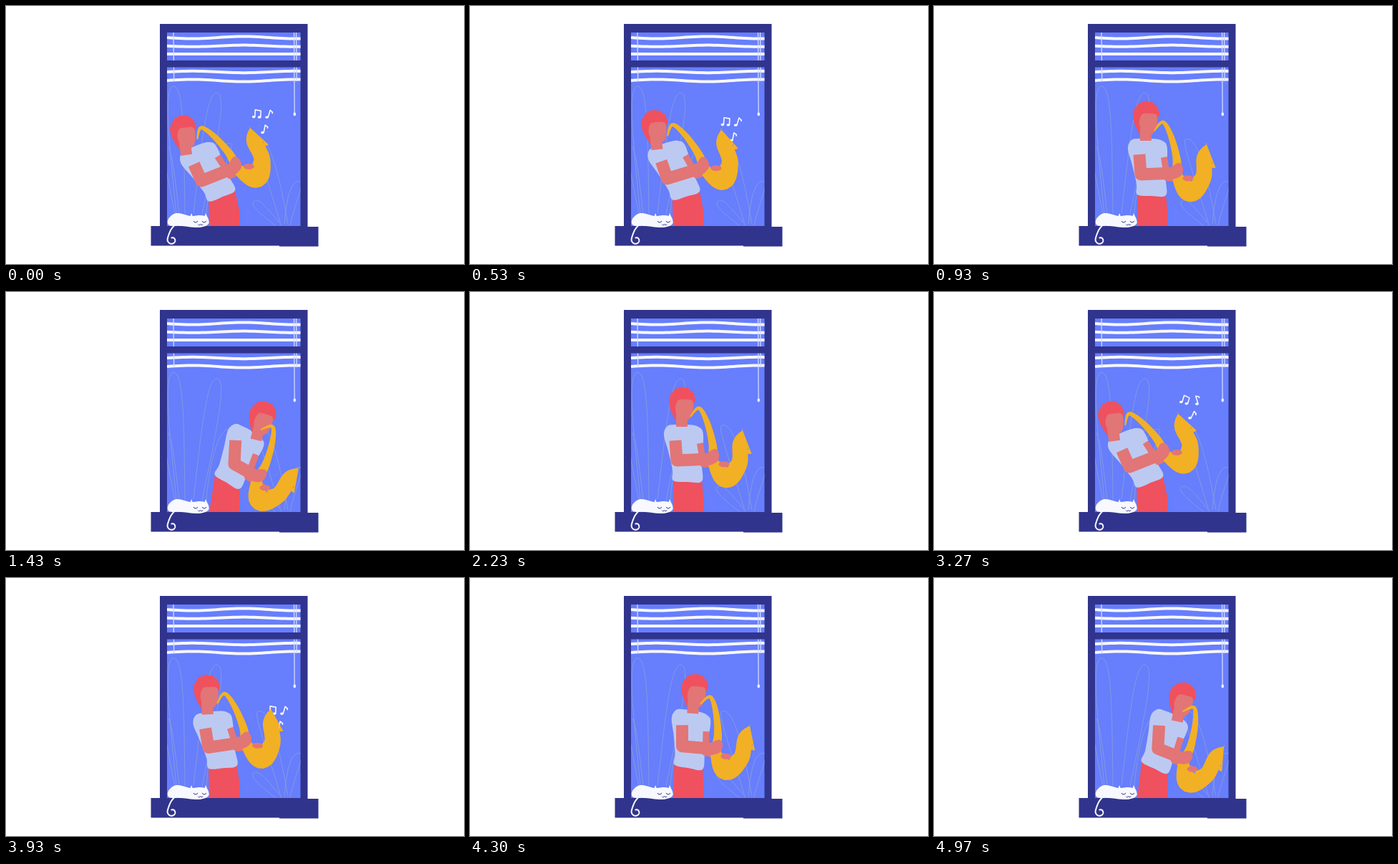
Write an HTML page with a canvas that moves like this. It is 640 px wide and 360 px high and loops after 5100 ms.

```html
<!DOCTYPE html>
<html lang="en">
<head>
<meta charset="utf-8">
<title>Saxophone at the window</title>
<style>
html, body { margin: 0; width: 100%; height: 100%; overflow: hidden; background: #fff; }
canvas { display: block; }
</style>
</head>
<body>
<canvas id="stage" width="640" height="360"></canvas>
<script>
const ctx = document.getElementById('stage').getContext('2d');
const COLOR = {
  frame: '#31348c', sky: '#677efd', leaf: '#8499e0', white: '#f8f8ff', cord: '#d3daff',
  red: '#ef515e', skin: '#e27576', shirt: '#bccaf2', gold: '#f2b024'
};

// The player sways back and forth in steps, pausing when bent forward.
const LOOP = 5100, STEP = 400 / 3, SWAY = 23.5 * STEP;
const BENT = 10.75 * STEP, RISE = BENT + 3 * STEP;
const TOP = 11, REST = 2;

function stepAt(time) {
  const t = time % SWAY + 3;
  if (t >= RISE) return TOP + 1 + Math.floor((t - RISE) / STEP);
  return t >= BENT ? TOP : Math.min(TOP - 1, Math.floor(t / STEP));
}

// 0 is leaning back, 1 is bent forward.
function leanAt(step) {
  const u = Math.max(0, 1 - Math.abs(step - TOP) / (TOP - REST));
  const v = u ** 1.25;
  return (v + (1 - Math.cos(Math.PI * v)) / 2) / 2;
}

// Quadratic through the back, upright and forward values.
function mix(p, back, up, fwd) {
  const m = .475, s1 = (up - back) / m, s2 = (fwd - up) / (1 - m);
  return back + s1 * p + (s2 - s1) * p * (p - m);
}

// Rigid part: rest pivot moves to (x, y) and turns by deg.
function rig(px, py, x, y, deg) {
  const a = deg * Math.PI / 180, c = Math.cos(a), s = Math.sin(a);
  return (u, v) => [x + (u - px) * c - (v - py) * s, y + (u - px) * s + (v - py) * c];
}

const still = (x, y) => [x, y];

function fill(color) {
  ctx.fillStyle = color;
  ctx.fill();
}

function stroke(color, width) {
  ctx.strokeStyle = color;
  ctx.lineWidth = width;
  ctx.stroke();
}

function rect(color, x, y, w, h) {
  ctx.fillStyle = color;
  ctx.fillRect(x, y, w, h);
}

function path(pts) {
  ctx.beginPath();
  pts.forEach(q => ctx.lineTo(...q));
}

function disc(color, [x, y], rx, ry = rx, tilt = 0) {
  ctx.beginPath();
  ctx.ellipse(x, y, rx, ry, tilt, 0, 2 * Math.PI);
  fill(color);
}

// Catmull-Rom samples through points of any dimension.
function spline(pts, closed) {
  const n = pts.length, out = [];
  const at = i => pts[closed ? (i + n) % n : Math.max(0, Math.min(n - 1, i))];
  for (let i = 0; i < (closed ? n : n - 1); i++) {
    const [a, b, c, d] = [at(i - 1), at(i), at(i + 1), at(i + 2)];
    for (let t = 0; t < 1; t += .125) {
      out.push(b.map((_, k) => b[k] + t / 2 * (c[k] - a[k] +
        t * (2 * a[k] - 5 * b[k] + 4 * c[k] - d[k] + t * (3 * (b[k] - c[k]) + d[k] - a[k])))));
    }
  }
  if (!closed) out.push(at(n - 1));
  return out;
}

function blob(color, pts, map = still) {
  path(spline(pts, true).map(q => map(...q)));
  fill(color);
}

// Tapered tube along [x, y, radius] points.
function tube(color, pts, map) {
  const mid = spline(pts), sides = [[], []];
  mid.forEach(([x, y, r], i) => {
    const a = mid[Math.max(0, i - 1)], b = mid[Math.min(mid.length - 1, i + 1)];
    const dx = b[0] - a[0], dy = b[1] - a[1], k = r / Math.hypot(dx, dy);
    sides[0].push(map(x - dy * k, y + dx * k));
    sides[1].unshift(map(x + dy * k, y - dx * k));
  });
  path(sides.flat());
  fill(color);
}

function limb(width, ...pts) {
  path(pts);
  stroke(COLOR.skin, width);
}

function leaf(bx, by, tx, ty, width, bend) {
  const dx = tx - bx, dy = ty - by, len = Math.hypot(dx, dy);
  const off = (t, w) => [bx + dx * t - dy / len * w, by + dy * t + dx / len * w];
  ctx.beginPath();
  for (const side of [-1, 1]) {
    ctx.moveTo(...off(0, side * width * .5));
    ctx.bezierCurveTo(...off(.5, side * width * .8 + bend), ...off(1, side * width * 1.3 + bend), tx, ty);
  }
  stroke(COLOR.leaf, 1);
}

function plants() {
  leaf(244, 290, 234, 112, 12, 0);
  leaf(268, 290, 295, 121, 12, 0);
  leaf(239, 290, 224, 195, 6, 0);
  leaf(284, 292, 315, 192, 9, -8);
  leaf(389, 305, 352, 186, 10, 5);
  leaf(380, 305, 346, 272, 7, 0);
  leaf(393, 305, 412, 245, 8, -5);
}

function blinds() {
  [44, 55.7, 67, 92, 104].forEach((y, i) => {
    const wave = 1.6 * Math.cos(i * .8), pts = [];
    for (let x = 0; x <= 187; x += 5.5) pts.push([225 + x, y + wave * Math.sin(x * .044)]);
    path(pts);
    stroke(COLOR.white, 4);
  });
  for (const [x, end] of [[234, 105], [402.5, 150], [405.5, 105]]) {
    path([[x, 37], [x + .7, end]]);
    stroke(COLOR.cord, 1.3);
  }
  disc(COLOR.white, [403.3, 151], 1.8, 2.4);
}

function note(x, y, deg, beamed) {
  const map = rig(0, 0, x, y, deg);
  const line = beamed ? [[-3, 5], [-3, -5], [5, -4], [5, 5]] : [[0, 5], [0, -6], [4, -4], [4, -2]];
  path(line.map(q => map(...q)));
  stroke(COLOR.white, 1.6);
  for (const hx of beamed ? [-4.6, 3.4] : [-1.6]) disc(COLOR.white, map(hx, 5), 2.3, 1.8);
}

// Notes slip behind the bell as the player straightens up.
function notes(p, step) {
  if (p > .4) return;
  const tilt = step % 2 ? -1 : 1, x = 64 * p, y = 104 * p;
  note(351 + x, 150 + y, 10 - 7 * tilt, true);
  note(367.5 + x, 151 + y, 17 * tilt, false);
  note(361 + x, 172 + y, 18 - 7 * tilt, false);
}

function drawHead(head) {
  for (let i = 0; i <= 6; i++) {
    const a = Math.PI * (.95 + i * .175);
    disc(COLOR.red, head(297 + 12 * Math.cos(a), 150 + 11.5 * Math.sin(a)), 6.3);
  }
  tube(COLOR.red, [[284, 147, 6], [285, 161, 5.5], [289, 178, 2]], head);
  disc(COLOR.red, head(297, 147), 10);
  limb(16, head(296, 170), head(296, 188));
  blob(COLOR.skin, [[291, 151], [301, 150], [311, 152], [312, 164], [308, 176],
    [300, 179], [290, 172], [287, 162]], head);
}

function player(p) {
  const torso = rig(304, 266, mix(p, 303, 304, 308), mix(p, 267, 266, 267), mix(p, -25, 0, 28));
  const head = rig(296, 165, mix(p, 249, 296, 355), mix(p, 185, 165, 184), mix(p, -8, 0, 14));
  const sax = rig(320, 161, mix(p, 272, 320, 373), mix(p, 169, 161, 187), mix(p, -27, 0, 31));

  path([[284, 308], torso(284, 262), torso(324, 262), [326, 285], [326, 308]]);
  fill(COLOR.red);
  blob(COLOR.shirt, [[287, 185], [276, 187], [271, 199], [277, 222], [283, 248], [284, 263],
    [304, 265], [324, 264], [324, 240], [326, 199], [319, 188], [304, 185]], torso);
  drawHead(head);

  limb(9, torso(321.5, 211), sax(326, 240), sax(353, 241));
  tube(COLOR.gold, [[308, 174, 1], [320, 162, 2.5], [331, 181, 4], [339, 212, 5.5], [341, 240, 8],
    [358, 258, 15.5], [376, 240, 11.5], [378, 214, 11.5], [387, 208.5, 18.5]], sax);

  const elbow = [mix(p, 273, 289, 319), mix(p, 244, 235, 240)];
  limb(17, torso(287, 207), elbow, sax(336, 233));
  blob(COLOR.skin, [[331, 227], [342, 219], [348, 226], [345, 237], [332, 241]], sax);
  disc(COLOR.skin, sax(355, 240.5), 7.5, 4);
}

function cat() {
  blob(COLOR.white, [[228, 306], [227, 297], [238, 289], [258, 293], [272, 292],
    [281, 295], [283, 304], [270, 309], [245, 307]]);
  for (const x of [259, 279]) {
    path([[x, 289], [x - 3, 298], [x + 4, 298]]);
    fill(COLOR.white);
  }
  const tail = [[236, 305], [230, 313]];
  for (let i = 0; i <= 7; i++) {
    const a = Math.PI * (1.1 - i * .25), r = 6.5 - i * .5;
    tail.push([232 + r * Math.cos(a), 326.5 + r * Math.sin(a)]);
  }
  path(spline(tail));
  stroke(COLOR.white, 2);
  for (const [x, y, r] of [[265, 299, 3], [277, 299, 3], [270, 304, 1.7], [273.4, 304, 1.7]]) {
    ctx.beginPath();
    ctx.arc(x, y, r, .3, 2.8);
    stroke(COLOR.frame, 1);
  }
}

function draw(time) {
  const step = stepAt(time), p = leanAt(step);

  rect('#fff', 0, 0, 640, 360);
  rect(COLOR.frame, 215, 25, 206.5, 284);
  rect(COLOR.sky, 225, 37, 186.5, 270);

  ctx.save();
  ctx.beginPath();
  ctx.rect(225, 37, 186.5, 270);
  ctx.clip();
  plants();
  blinds();
  notes(p, step);
  player(p);
  ctx.restore();

  rect(COLOR.frame, 215, 76, 206, 9.5);
  rect(COLOR.frame, 202.5, 307, 180, 27.5);
  rect(COLOR.frame, 382, 308, 54.5, 27.5);
  cat();
}

ctx.lineJoin = 'round';
function tick(now) {
  draw(now % LOOP);
  requestAnimationFrame(tick);
}
draw(0);
requestAnimationFrame(tick);
</script>
</body>
</html>
```
